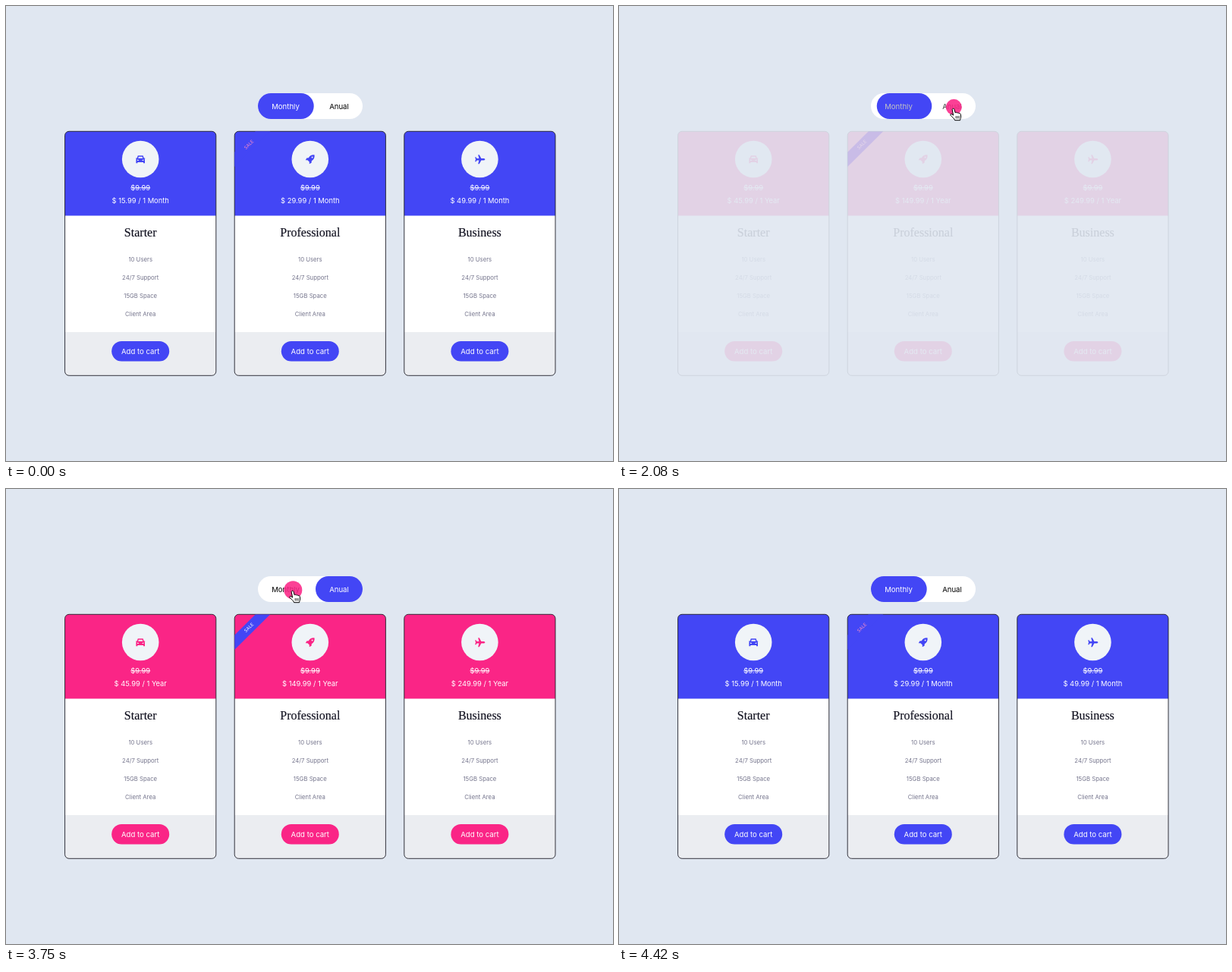
An HTML page for the animation above (6580 ms loop, 800 by 600 pixels).

```html
<!DOCTYPE html>
<html lang="en">
<head>
<meta charset="utf-8">
<title>Pricing toggle</title>
<style>
  html, body { margin: 0; width: 100%; height: 100%; overflow: hidden; background: #e0e7f1; }
  svg { display: block; width: 100%; height: 100%; --blue: #4346f5; --pink: #fa2586; --tone: var(--blue); }
  text { font-family: Inter, sans-serif; font-size: 9.6px; text-anchor: middle; fill: #fff; }
  .tone { fill: var(--tone); }
  .disc { fill: #f0f4f8; }
  .price { font-size: 9.4px; }
  .old { text-decoration: line-through; }
  .title { font-family: "Liberation Serif", serif; font-size: 16px; fill: #10101f; stroke: #10101f; stroke-width: .15px; }
  .item { font-size: 7.75px; fill: #74748c; }
  .sale { font-size: 6px; }
  .frame { fill: none; stroke: #1d1d28; stroke-width: .9px; }
</style>
</head>
<body>
<svg viewBox="0 0 800 600">
  <defs>
    <clipPath id="round"><rect x="-99.6" y="165.3" width="199.2" height="322" rx="5.5"/></clipPath>
  </defs>
  <rect width="800" height="600" fill="#e0e7f1"/>
  <rect x="332" y="115" width="138" height="34" rx="17" fill="#fff"/>
  <rect id="pill" y="115" height="34" rx="17" fill="var(--blue)"/>
  <text id="monthly" x="368.5" y="135.5">Monthly</text>
  <text id="annual" x="439" y="135.5">Anual</text>
  <g id="cards"></g>
  <g id="ribbon" transform="translate(400.8 0)">
    <path d="M-72 165.3H-52.5L-99.6 212V192.8Z" fill="var(--blue)" clip-path="url(#round)"/>
    <text id="sale" class="sale" transform="translate(-80.8 182.6) rotate(-45)" y="2.2">SALE</text>
  </g>
  <circle id="click" cy="133.3" fill="var(--pink)" fill-opacity=".88"/>
  <g id="arrow">
    <path d="M0 0V23L5 18.4 8 26 11.6 24.6 8.6 17.2H15.5Z" fill="#000" stroke="#fff" stroke-width="1.7" paint-order="stroke"/>
  </g>
  <g id="hand" fill="#fff" stroke="#000" stroke-width="1" stroke-linejoin="round">
    <path d="M3.2 2.2C3.2.4 5.6.2 6 2L7.2 6.3C8 5.4 9.3 5.7 9.7 6.6 10.6 6 11.7 6.3 12 7.2 13 6.8 14.3 7.4 14.4 8.6L14.6 11.5C14.6 13.4 13.8 14 13.6 16.2H6.6C6 13.8 3 12 1 9.6.2 8.3 1.6 7.4 2.8 8.2L4.6 9.6Z"/>
    <path d="M8.2 10.5V14M10.2 10.5V14M12.2 10.5V14" stroke-width=".8"/>
  </g>
</svg>
<script>
const $ = id => document.getElementById(id);
const plans = [
  { name: 'Starter', month: '15.99', year: '45.99', size: [12, 10.5],
    icon: 'M2.6.4H9.4L10.6 3.6H12V4.6L11.3 4.8Q11.8 5.3 11.8 6V10.4H9.8V9H2.2V10.4H.2V6Q.2 5.3.7 4.8L0 4.6V3.6H1.4ZM3.6 1.9L2.9 3.9H9.1L8.4 1.9ZM1.8 5.5V7H3.6V6ZM10.2 5.5V7H8.4V6Z' },
  { name: 'Professional', month: '29.99', year: '149.99', size: [12, 12],
    icon: 'M11.8.2C8-.3 5.6 1.5 4 4L1.5 4.2 0 7H2.6L5 9.4V12L7.8 10.5 8 8C10.5 6.4 12.3 4 11.8.2ZM8.8 2.2A1 1 0 1 1 8.8 4.2 1 1 0 1 1 8.8 2.2Z' },
  { name: 'Business', month: '49.99', year: '249.99', size: [14, 12],
    icon: 'M14 6C14 6.8 12.6 7.3 11.6 7.3H9L6.4 12H4.8L6 7.3H3.2L2 9H.8L1.6 6 .8 3H2L3.2 4.7H6L4.8 0H6.4L9 4.7H11.6C12.6 4.7 14 5.2 14 6Z' }
];
const items = ['10 Users', '24/7 Support', '15GB Space', 'Client Area'];

$('cards').innerHTML = plans.map((plan, i) => `
  <g transform="translate(${177.2 + 223.6 * i} 0)">
    <g clip-path="url(#round)">
      <rect x="-100" y="165" width="200" height="323" fill="#fff"/>
      <rect class="tone" x="-100" y="165" width="200" height="111.5"/>
      <rect x="-100" y="430" width="200" height="58" fill="#ebedf1"/>
    </g>
    <rect class="frame" x="-99.6" y="165.3" width="199.2" height="322" rx="5.5"/>
    <circle class="disc" cy="202" r="24.3"/>
    <path class="tone" fill-rule="evenodd" d="${plan.icon}"
      transform="translate(${-plan.size[0] / 2} ${202.2 - plan.size[1] / 2})"/>
    <text class="price old" y="242.8">$9.99</text>
    <text class="price now" y="260.4"></text>
    <text class="title" y="303.7">${plan.name}</text>
    ${items.map((item, n) => `<text class="item" y="${336.9 + 23.9 * n}">${item}</text>`).join('')}
    <rect class="tone" x="-38" y="442" width="76" height="26.5" rx="13.2"/>
    <text y="458.6">Add to cart</text>
  </g>`).join('');

const LOOP = 6580, FPS = 12;
const TO_YEAR = 2031, TO_MONTH = 3800;
const CLICKS = [{ tick: 23, x: 441.3 }, { tick: 44, x: 378.3 }];
const RADII = [6, 12, 10.5, 7.3, 5.6, 4.5, 3.7, 3, 2];
const prices = document.querySelectorAll('.now');

const clamp = v => Math.min(1, Math.max(0, v));
const mix = (a, b, u) => a + (b - a) * u;
const smooth = u => u * u * (3 - 2 * u);
const cubic = (a, b, c, d, u) => {
  const v = 1 - u;
  return a * v * v * v + 3 * b * v * v * u + 3 * c * v * u * u + d * u * u * u;
};

// The CSS "ease" curve
function ease(x) {
  let lo = 0, hi = 1;
  for (let i = 0; i < 24; i++) {
    const mid = (lo + hi) / 2;
    if (cubic(0, .25, .25, 1, mid) < x) lo = mid; else hi = mid;
  }
  return cubic(0, .1, 1, 1, lo);
}

function pointer(tick) {
  if (tick < 13 || tick > 50) return null;
  if (tick <= 35) {
    const u = smooth(clamp((tick - 13) / 7));
    return [cubic(664, 640, 500, 440.5, u), cubic(164.5, 300, 280, 134.5, u)];
  }
  if (tick <= 45) return [mix(440.5, 377.5, smooth(clamp((tick - 35) / 7))), 133.5];
  const u = ((tick - 45) / 5) ** 2.8;
  return [mix(377.5, 722, u), mix(133.5, 184, u)];
}

function place(el, shown, x, y) {
  el.style.display = shown ? '' : 'none';
  if (shown) el.setAttribute('transform', `translate(${x} ${y})`);
}

function gray(el, u) {
  const v = Math.round(255 * u);
  el.style.fill = `rgb(${v},${v},${v})`;
}

function drawCards(time) {
  const yearly = time >= TO_YEAR && time < TO_MONTH;
  const age = time < TO_YEAR ? LOOP : time - (yearly ? TO_YEAR : TO_MONTH);
  const fade = ease(clamp(age / 500)), ink = ease(clamp(age / 300));
  const slide = yearly ? fade : 1 - fade;
  const left = mix(332, 408, slide), right = mix(405.7, 470, slide);

  $('pill').setAttribute('x', left);
  $('pill').setAttribute('width', right - left);
  gray($('monthly'), yearly ? 1 - ink : ink);
  gray($('annual'), yearly ? ink : 1 - ink);
  document.querySelector('svg').style.setProperty('--tone', `var(--${yearly ? 'pink' : 'blue'})`);
  $('cards').style.opacity = 1;
  for (const card of $('cards').children) card.style.opacity = fade;
  $('ribbon').style.opacity = Math.max(fade, yearly ? .15 : .4);
  $('sale').style.fill = yearly || fade < .7 ? '#fff' : '#ff8cc4';
  prices.forEach((el, i) => {
    el.textContent = yearly ? `$ ${plans[i].year} / 1 Year` : `$ ${plans[i].month} / 1 Month`;
  });
}

function drawPointer(tick) {
  const hit = CLICKS.find(c => tick >= c.tick && tick < c.tick + RADII.length);
  $('click').setAttribute('r', hit ? RADII[tick - hit.tick] : 0);
  if (hit) $('click').setAttribute('cx', hit.x);

  const spot = pointer(tick), [x, y] = spot || [0, 0];
  const over = x > 332 && x < 470 && y > 115 && y < 149;
  place($('arrow'), spot && !over, x, y);
  place($('hand'), spot && over, x - 4.5, y);
}

// Motion advances in whole ticks, twelve per second
function draw(now) {
  const tick = Math.floor((now % LOOP + 5) * FPS / 1000);
  drawCards(tick * 1000 / FPS);
  drawPointer(tick);
}

const begin = performance.now();
function run() {
  draw(performance.now() - begin);
  requestAnimationFrame(run);
}
run();
</script>
</body>
</html>
```
